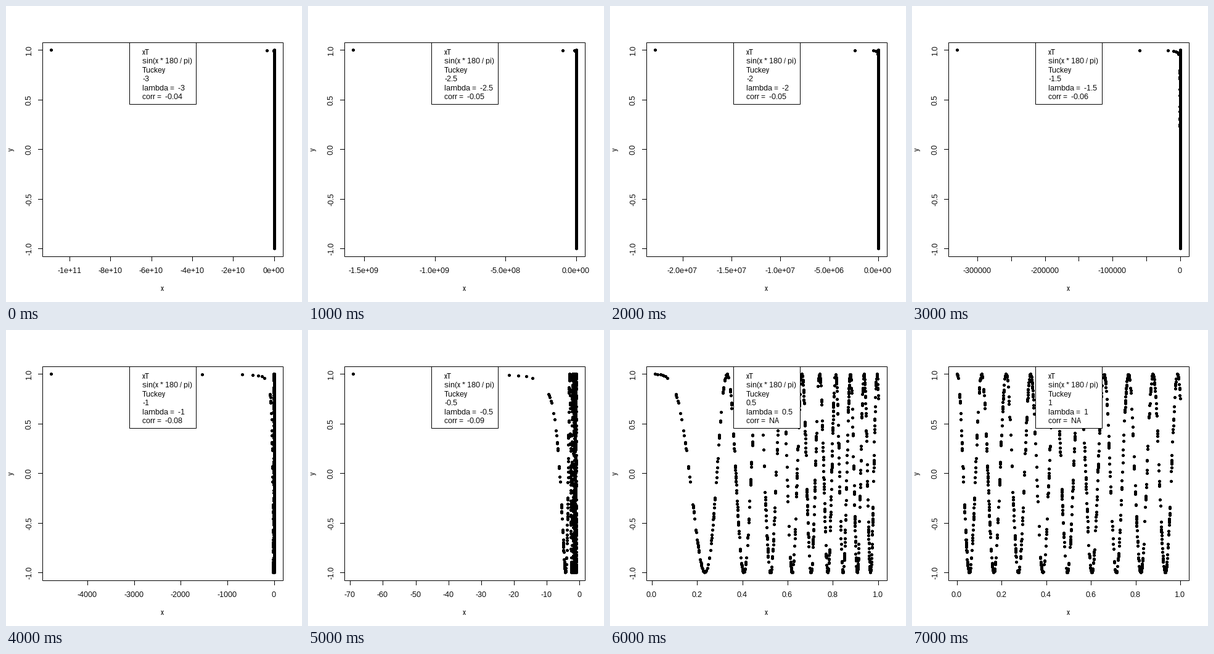
Write a matplotlib script that moves like this. It is 480 px wide and 480 px high and loops after 8000 ms.

```python
import math

import matplotlib.pyplot as plt
import numpy as np
from matplotlib.animation import ArtistAnimation
from matplotlib.patches import Rectangle

SIZE, DPI = 480, 96
PX = 72 / DPI  # points per pixel
LEFT, RIGHT, TOP, BOTTOM = 59, 449, 59, 406
X_LO, X_SPAN = 73.51, 361.78
Y_MID, Y_HALF = 232.8, 160.9
PAD = 0.04  # share of the data range left free at each end
DOT = 4.1  # fills a 5 pixel disc when drawn without antialiasing

LAMBDAS = (-3, -2.5, -2, -1.5, -1, -0.5, 0.5, 1)
CORRS = ("-0.04", "-0.05", "-0.05", "-0.06", "-0.08", "-0.09", "NA", "NA")

plt.rcParams.update({
    "font.family": "Liberation Sans",
    "font.size": 12 * PX,
    "text.hinting": "native",
    "text.hinting_factor": 1,
    "text.kerning_factor": 6,  # whole-pixel spacing without kerning
})


def make_sample():
    """Uniform values; the smallest ones are set as they become outliers."""
    rng = np.random.default_rng(7)
    smallest = [2.093e-4, 6.49e-4, 1.47e-3, 2.17e-3, 2.9e-3, 3.8e-3, 4.9e-3]
    return np.concatenate([smallest, rng.uniform(0.008, 0.9995, 992), [0.9995]])


def tick_step(span):
    """Round step of 1, 2, 5 or 10 times a power of ten."""
    cell = span * (1 + 2 * PAD) / 5
    base = 10 ** math.floor(math.log10(cell))
    step = base
    for factor, bias in ((2, 0.8), (5, 1.7), (10, 0.8)):
        if factor * base - cell >= bias * (cell - step):
            break
        step = factor * base
    return step


def tick_format(ticks, step):
    if step < 1:
        return ".1f"
    if max(map(abs, ticks)) < 1e6:
        return ".0f"
    whole = all(float(f"{t:.0e}") == t for t in ticks)
    return ".0e" if whole else ".1e"


def pixel(v):
    """Centre of the pixel that holds v."""
    return np.floor(v) + 0.5


fig = plt.figure(figsize=(SIZE / DPI, SIZE / DPI), dpi=DPI, facecolor="white")
ax = fig.add_axes([0, 0, 1, 1])
ax.set(xlim=(0, SIZE), ylim=(SIZE, 0), autoscale_on=False)
ax.axis("off")


def line(x0, y0, x1, y1):
    return ax.plot(pixel([x0, x1]), pixel([y0, y1]), color="black",
                   lw=PX, snap=False)[0]


def label(x, y, s, ha="center", angle=0):
    return ax.text(x, y, s, ha=ha, va="baseline", rotation=angle,
                   rotation_mode="anchor", zorder=6)


def legend_row(row, s):
    return label(221, round(79.04 + 14.4 * row), s, ha="left")


def box(x0, y0, x1, y1, fill, z):
    ax.add_patch(Rectangle((x0 + 0.5, y0 + 0.5), x1 - x0, y1 - y0, fc=fill,
                           ec="black", lw=PX, snap=False, zorder=z))


def draw_fixed():
    box(LEFT, TOP, RIGHT, BOTTOM, "none", 2)
    box(200, 59, 308, 159, "white", 5)
    for v in np.linspace(-1, 1, 5):
        y = Y_MID - Y_HALF * v
        line(52, y, LEFT, y)
        label(41, y, f"{v:.1f}", angle=90)
    label(253, 462, "x")
    label(12, Y_MID, "y", angle=90)
    for row, s in enumerate(("xT", "sin(x * 180 / pi)", "Tuckey")):
        legend_row(row, s)


def draw_x_axis(lo, span, to_px):
    step = tick_step(span)
    first = math.ceil((lo - PAD * span) / step)
    last = math.floor((lo + span + PAD * span) / step)
    ticks = [k * step for k in range(first, last + 1)]
    texts = [format(t, tick_format(ticks, step)) for t in ticks]

    # Label every other tick when neighbours would come too close
    room = to_px(step) - to_px(0)
    skip = 2 if 7 * max(map(len, texts)) + 10 > room else 1
    artists = [line(to_px(t), BOTTOM, to_px(t), 413) for t in ticks]
    artists += [label(to_px(t) - 1, 433, s)
                for t, s in list(zip(ticks, texts))[::skip]]
    return artists


def draw_step(x, lam, corr):
    xt = math.copysign(1, lam) * x ** lam
    lo, span = xt.min(), np.ptp(xt)

    def to_px(v):
        return X_LO + X_SPAN * (v - lo) / span

    y = Y_MID - Y_HALF * np.cos(x * 180 / math.pi)
    dots = ax.scatter(pixel(to_px(xt)), pixel(y), s=(DOT * PX) ** 2,
                      c="black", edgecolors="none", linewidths=0,
                      antialiased=False, zorder=3)
    rows = (f"{lam:g}", f"lambda =  {lam:g}", f"corr =  {corr}")
    return [dots, *draw_x_axis(lo, span, to_px),
            *(legend_row(3 + i, s) for i, s in enumerate(rows))]


draw_fixed()
sample = make_sample()
steps = [draw_step(sample, lam, corr) for lam, corr in zip(LAMBDAS, CORRS)]
anim = ArtistAnimation(fig, steps, interval=1000, repeat=True, repeat_delay=0)
plt.show()
```
